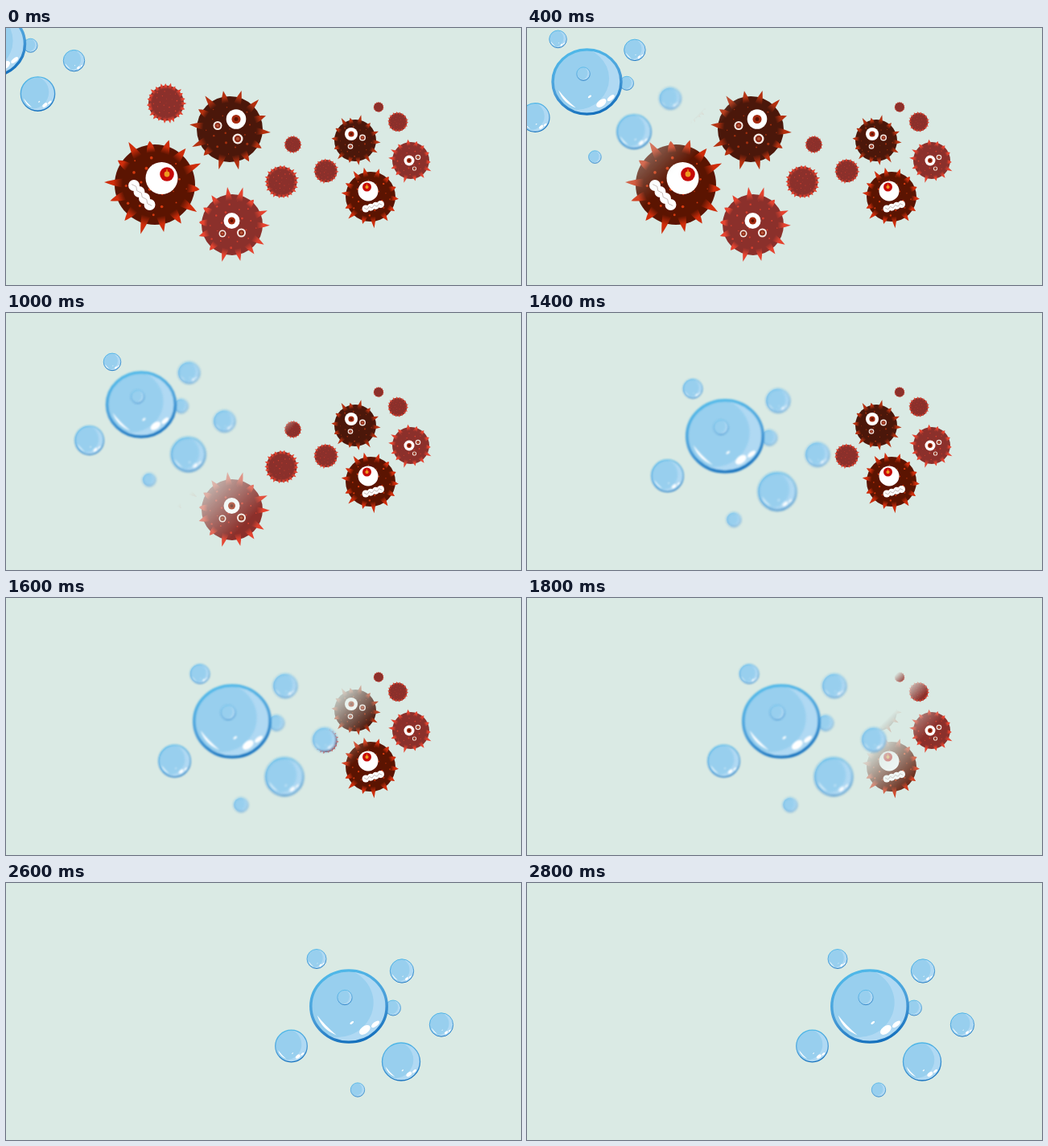
Animation of 640 by 320 pixels, one loop 3000 ms. Source, as an HTML page with a canvas:

```html
<!DOCTYPE html>
<html lang="en">
<head>
<meta charset="utf-8">
<title>Bubbles washing germs away</title>
<style>
  html, body { margin: 0; width: 100%; height: 100%; overflow: hidden; background: #daeae4; }
  canvas { display: block; width: 640px; height: 320px; }
</style>
</head>
<body>
<canvas id="stage" width="640" height="320"></canvas>
<script>
const W = 640, H = 320, STEP = 200, LOOP = 3000, TAU = Math.PI * 2, RAD = Math.PI / 180;
const stage = document.getElementById('stage').getContext('2d');

function layer() {
  const c = document.createElement('canvas');
  c.width = W;
  c.height = H;
  return c.getContext('2d');
}

function clamp(v) {
  return Math.max(0, Math.min(1, v));
}

function random(seed) {
  return () => (seed = (seed * 16807) % 2147483647) / 2147483647;
}

function disc(g, x, y, r, color) {
  g.fillStyle = color;
  g.beginPath();
  g.arc(x, y, r, 0, TAU);
  g.fill();
}

// ---- germs ----
const DARK = { body: '#4b170a', spike: '#b5300f', dot: '#a3300f' };
const BROWN = { body: '#5b1401', spike: '#cf2d0b', dot: '#d43a10' };
const RED = { body: '#8b302b', spike: '#e5432f', dot: '#d8402f' };

function drawSpike(g, r, angle, length, width, skin) {
  const base = r * .8;
  const shade = g.createLinearGradient(base, 0, length, 0);
  shade.addColorStop(0, skin.body);
  shade.addColorStop(.5, skin.spike);
  g.save();
  g.rotate(angle);
  g.fillStyle = shade;
  g.beginPath();
  g.moveTo(base, -width);
  g.quadraticCurveTo(r, -width * .8, length, 0);
  g.quadraticCurveTo(r, width * .8, base, width);
  g.fill();
  g.restore();
}

function drawBody(g, x, y, r, skin, spikes, reach) {
  const rnd = random(Math.round(x * 31 + y * 7));
  g.save();
  g.translate(x, y);
  disc(g, 0, 0, r, skin.body);
  for (let i = 0; i < 24; i++) {
    const a = i * 2.4, d = r * Math.sqrt(i / 24) * .85;
    disc(g, d * Math.cos(a), d * Math.sin(a), r * (.015 + .025 * rnd()), skin.dot);
  }
  for (let i = 0; i < spikes; i++) {
    const angle = (i + .3 * rnd()) / spikes * TAU;
    drawSpike(g, r, angle, r * (1.08 + reach * rnd()), r * .11, skin);
  }
  g.restore();
}

function eye(g, x, y, r) {
  disc(g, x, y, r, '#fff');
  disc(g, x, y, r * .45, '#a4290e');
  disc(g, x, y, r * .2, '#5d1204');
}

function ringEye(g, x, y, r) {
  disc(g, x, y, r, '#f6ece6');
  disc(g, x, y, r * .64, '#8b2a18');
  disc(g, x, y, r * .3, '#b85a3c');
}

function redEye(g, x, y, r, dx, dy) {
  disc(g, x, y, r, '#fff');
  disc(g, x + dx, y + dy, r * .44, '#c60a08');
  disc(g, x + dx, y + dy, r * .17, '#ee9a20');
  g.fillRect(x + dx - r * .03, y + dy - r * .3, r * .06, r * .3);
}

function teeth(g, x1, y1, x2, y2, r) {
  const spots = [0, 1, 2, 3].map(i => [x1 + (x2 - x1) * i / 3, y1 + (y2 - y1) * i / 3]);
  for (const [x, y] of spots) disc(g, x, y, r, '#fff');
  g.strokeStyle = '#b9aaa5';
  g.lineWidth = .8;
  g.beginPath();
  for (const [x, y] of spots) {
    g.lineTo(x - r * .4, y - r * .2);
    g.lineTo(x + r * .4, y + r * .2);
  }
  g.stroke();
}

const germs = [];

// `fade` is the time at which the germ starts to dissolve.
function germ(x, y, r, skin, fade, face) {
  const art = layer();
  drawBody(art, x, y, r, skin, 14, .2);
  face(art);
  germs.push({ x, y, r, fade, art });
}

function speck(x, y, r, fade) {
  const art = layer();
  drawBody(art, x, y, r, RED, Math.round(12 + r * .5), .1);
  germs.push({ x, y, r, fade, art });
}

speck(199, 93.5, 22, 20);
speck(356.5, 145, 10, 950);
speck(342.5, 191.5, 19, 1030);
speck(397.5, 178, 14, 1510);
speck(463, 98.5, 6, 1700);
speck(487, 117, 11.5, 1700);

germ(185, 195, 50, BROWN, 230, g => {
  redEye(g, 193.5, 187, 20, 6.5, -5);
  teeth(g, 159, 196, 178.5, 220, 7);
});
germ(278, 126, 41, DARK, 340, g => {
  eye(g, 286, 113.5, 12.3);
  ringEye(g, 263, 121.5, 5.5);
  ringEye(g, 288, 138, 6.5);
});
germ(281, 245, 38, RED, 760, g => {
  eye(g, 280.5, 240, 10);
  ringEye(g, 269, 256, 4.5);
  ringEye(g, 292.5, 255, 5.5);
});
germ(434, 140, 26, DARK, 1390, g => {
  eye(g, 429, 132, 8);
  ringEye(g, 443, 136.5, 4);
  ringEye(g, 428, 147.5, 3.3);
});
germ(453, 210, 31, BROWN, 1530, g => {
  redEye(g, 450, 203, 12.5, -1.5, -5);
  teeth(g, 447, 225, 465.5, 219.5, 4.5);
});
germ(503, 165, 23, RED, 1700, g => {
  eye(g, 501, 165, 6.5);
  ringEye(g, 512, 161, 3.3);
  ringEye(g, 507.5, 175, 2.6);
});

// Each germ dissolves from its upper left to its lower right; large ones take longer.
const scratch = layer();
function drawGerm({ x, y, r, fade, art }, time) {
  const done = (time - fade) / (100 + 14 * r);
  if (done >= 1) return;
  if (done <= 0) return stage.drawImage(art.canvas, 0, 0);
  const span = r * .85, shift = span * (4 * done - 2);
  const mask = scratch.createLinearGradient(
    x + shift - span, y + shift - span, x + shift + span, y + shift + span);
  mask.addColorStop(0, 'transparent');
  mask.addColorStop(1, '#000');
  scratch.globalCompositeOperation = 'copy';
  scratch.drawImage(art.canvas, 0, 0);
  scratch.globalCompositeOperation = 'destination-in';
  scratch.fillStyle = mask;
  scratch.fillRect(0, 0, W, H);
  stage.drawImage(scratch.canvas, 0, 0);
}

// ---- bubbles ----
// Key times and horizontal positions of the big bubble.
const route = [[0, -19], [200, 54], [600, 95], [1000, 168], [1400, 246], [1800, 316], [2200, 426]];

function travel(time) {
  let x = route[0][1];
  for (let i = 1; i < route.length; i++) {
    const [t0, x0] = route[i - 1], [t1, x1] = route[i];
    x += (x1 - x0) * clamp((time - t0) / (t1 - t0));
  }
  return [x, Math.min(153.5, 29.5 + x * .503)];
}

function patch(g, x, y, w, h) {
  g.beginPath();
  g.ellipse(x, y, w, h, -.7, 0, TAU);
  g.fill();
}

function drawBubble(g, x, y, r, squash, line, blur) {
  g.save();
  if (blur > .05) g.filter = `blur(${blur}px)`;
  g.translate(x, y);
  g.scale(r, r * squash);

  disc(g, 0, 0, 1, '#b0d9f3');
  g.save();
  g.beginPath();
  g.arc(0, 0, 1, 0, TAU);
  g.clip();
  disc(g, -.32, -.1, .97, '#98cfee');
  g.restore();

  if (r > 10) {
    g.fillStyle = '#fff';
    g.beginPath();
    g.arc(0, 0, .87, 112 * RAD, 163 * RAD);
    g.quadraticCurveTo(-.63, .54, -.32, .81);
    g.fill();
    patch(g, .42, .66, .17, .1);
    patch(g, .7, .5, .13, .06);
    patch(g, .08, .46, .06, .03);
  }

  const rim = g.createLinearGradient(-.4, -1, .2, 1);
  rim.addColorStop(0, '#4fb9e9');
  rim.addColorStop(.55, '#4a9dd8');
  rim.addColorStop(1, '#1470bd');
  g.strokeStyle = rim;
  g.lineWidth = line / r;
  g.beginPath();
  g.arc(0, 0, 1, 0, TAU);
  g.stroke();
  g.restore();
}

function drawBubbles(time) {
  const [cx, cy] = travel(time);
  const scale = .9 + .1 * clamp((time - 1000) / 400);
  const haze = clamp((2800 - time) / 600);
  const draw = (dx, dy, r, squash = 1) => {
    const x = cx + dx * scale, y = cy + dy * scale;
    const softness = dx > 0 ? 1.8 : 1.1;
    const blur = clamp((x + y - 252) / 14) * softness * haze;
    drawBubble(stage, x, y, r * scale, squash, .7 + r * r / 800, blur);
  };
  draw(55, 2, 9.5);
  draw(0, 0, 47.2, .945);
  draw(-5, -11, 9.2);
  draw(-40, -59, 12);
  draw(66, -44, 14.7);
  draw(115, 23, 14.7);
  draw(65, 69, 23.5);
  draw(11, 104, 8.7);
  draw(-71.5, 49.5, 19.8);
}

const start = performance.now();
let shown = -1;
function tick() {
  const elapsed = (performance.now() - start) % LOOP;
  const time = Math.floor(elapsed / STEP) * STEP;
  if (time !== shown) {
    shown = time;
    stage.fillStyle = '#daeae4';
    stage.fillRect(0, 0, W, H);
    for (const g of germs) drawGerm(g, time);
    drawBubbles(time);
  }
  requestAnimationFrame(tick);
}
tick();
</script>
</body>
</html>
```
